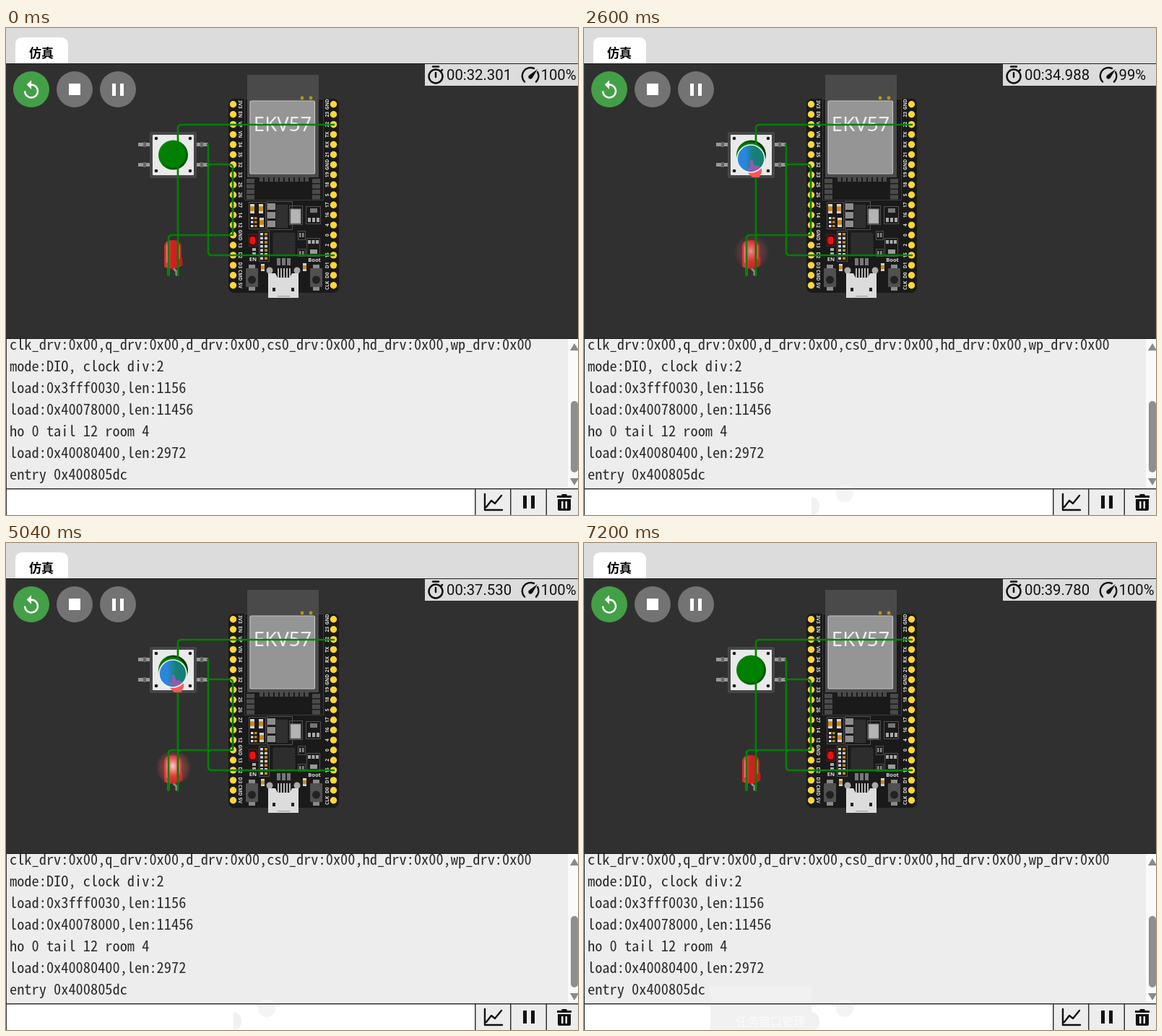
An HTML page for the animation above (7240 ms loop, 792 by 675 pixels).

```html
<!DOCTYPE html>
<html lang="zh">
<head>
<meta charset="utf-8">
<style>
html, body { margin: 0; width: 792px; height: 675px; overflow: hidden; background: #303030; }
svg { display: block; }
.log { font: 20.36px 'Noto Sans Mono CJK SC', 'Liberation Mono', monospace; font-size-adjust: ch-width .5; fill: #2c2c2c; }
.tab { font: bold 17px 'Noto Sans CJK SC', 'Noto Sans CJK', sans-serif; }
.hud { font: 20.3px Roboto, sans-serif; fill: #111; }
.pin { font: bold 6.6px 'Noto Sans', sans-serif; fill: #ddd; text-anchor: middle; }
.chip { font: 27.5px 'Noto Sans', 'Open Sans', sans-serif; fill: #efefef; text-anchor: middle; }
.line { fill: none; stroke-linecap: round; stroke-linejoin: round; }
</style>
</head>
<body>
<svg width="792" height="675" viewBox="0 0 792 675">
  <defs>
    <linearGradient id="cap" x1="0" y1="0" x2="1" y2="1">
      <stop offset="0" stop-color="#0c8a0c"/><stop offset=".5" stop-color="#007400"/><stop offset="1" stop-color="#043c04"/>
    </linearGradient>
    <linearGradient id="capDown" x1="0" y1="1" x2="1" y2="0">
      <stop offset="0" stop-color="#008000"/><stop offset=".5" stop-color="#007000"/><stop offset="1" stop-color="#021802"/>
    </linearGradient>
    <linearGradient id="lens">
      <stop offset=".3" stop-color="#2a86dc"/><stop offset=".6" stop-color="#168078"/>
    </linearGradient>
    <linearGradient id="bulb">
      <stop offset="0" stop-color="#c82424"/><stop offset=".2" stop-color="#e05050"/><stop offset=".4" stop-color="#cf2020"/>
      <stop offset=".8" stop-color="#cf2020"/><stop offset="1" stop-color="#b81818"/>
    </linearGradient>
    <radialGradient id="glow">
      <stop offset="0" stop-color="#ff8080" stop-opacity=".5"/><stop offset=".5" stop-color="#ff6060" stop-opacity=".4"/>
      <stop offset=".8" stop-color="#c05050" stop-opacity=".28"/><stop offset="1" stop-color="#a04848" stop-opacity="0"/>
    </radialGradient>
    <radialGradient id="core">
      <stop offset="0" stop-color="#fff" stop-opacity=".8"/><stop offset="1" stop-color="#ffb0a8" stop-opacity="0"/>
    </radialGradient>
    <clipPath id="logClip"><path d="M0 431h778v206H0z"/></clipPath>
  </defs>

  <!-- header -->
  <path fill="#dcdcdc" d="M0 0h792v49H0z"/>
  <path fill="#fff" d="M13 49V23q0-10 10-10h53q10 0 10 10v26z"/>
  <text class="tab" x="32" y="41">仿真</text>
  <path fill="#1c1c1c" d="M0 49h792v1H0z"/>

  <!-- transport buttons -->
  <circle cx="35" cy="85" r="25" fill="#43a047"/>
  <circle cx="95" cy="85" r="25" fill="#737373"/>
  <circle cx="155" cy="85" r="25" fill="#737373"/>
  <path fill="#fff" transform="translate(19.8 71) scale(1.27)" d="M12 5V1L7 6l5 5V7c3.31 0 6 2.69 6 6s-2.69 6-6 6-6-2.69-6-6H4c0 4.42 3.58 8 8 8s8-3.58 8-8-3.58-8-8-8z"/>
  <path fill="#fff" d="M87 77h16v16H87zM147 77h5v17h-5zM158 77h5v17h-5z"/>

  <!-- clock panel -->
  <path fill="#dcdcdc" d="M580 50h212v30H580z"/>
  <g class="line" stroke="#111" stroke-width="2.5">
    <circle cx="595" cy="67" r="9.5"/>
    <path d="M591 53.5h8M595 62v6M602 60l2-2"/>
    <path d="M718 74.5A11.5 11.5 0 0 1 731 56M736 61A11.5 11.5 0 0 1 734 74.5"/>
  </g>
  <path fill="#111" d="M736 57l-7 12q-2 3-5 1-2-3 1-5z"/>
  <text class="hud" id="clock" x="610" y="72"></text>
  <text class="hud" id="speed" x="740.5" y="72"></text>

  <g id="board"></g>

  <!-- push button -->
  <path fill="#999" d="M183 159h18v5h-18zM183 187h18v5h-18zM263 159h17v5h-17zM263 187h17v5h-17z"/>
  <path fill="#666" d="M190 158h4v7h-4zM190 186h4v7h-4zM269 158h4v7h-4zM269 186h4v7h-4z"/>
  <rect x="199" y="144" width="65" height="64" rx="2" fill="#464646"/>
  <rect x="203" y="148" width="57" height="56" rx="1" fill="#eaeaea"/>
  <g fill="#1c1c1c"><circle cx="208" cy="153" r="2.3"/><circle cx="255" cy="153" r="2.3"/><circle cx="208" cy="198" r="2.3"/><circle cx="255" cy="198" r="2.3"/></g>
  <circle id="capRim" cx="231.5" cy="176" r="20.5"/>
  <circle cx="231.5" cy="176" r="17.5" fill="#008000"/>

  <!-- lamp -->
  <path class="line" stroke="#8c8c8c" stroke-width="3" d="M225 331v11M232 331q0 4 4 6v5"/>
  <path fill="url(#bulb)" d="M219 331V304q0-10 12-10t12 10v13l1.500 3v9q-12 8-25.500 2z"/>
  <path fill="#fff" opacity=".3" d="M222 303q1-5 5-6-2 3-2 8v20h-3z"/>
  <path fill="#fff" opacity=".25" d="M238 298q3 2 3 6v16h-2z"/>
  <g id="light">
    <circle cx="232" cy="311" r="25" fill="url(#glow)"/>
    <ellipse cx="231" cy="309" rx="11" ry="15" fill="url(#core)"/>
  </g>

  <!-- wires -->
  <path class="line" stroke="#008000" stroke-width="2.7" d="M454 134H243q-5 0-5 5V343M225 343V292q0-5 5-5H314V194q0-5-5-5H279M279 161q1 1 1 5V310q0 5 5 5H454"/>

  <!-- console -->
  <path fill="#1c1c1c" d="M0 430h792v1H0z"/>
  <path fill="#ededed" d="M0 431h792v207H0z"/>
  <g id="log" class="log" clip-path="url(#logClip)"></g>
  <path fill="#fafafa" d="M778 431h14v207h-14z"/>
  <rect x="782" y="517" width="10" height="99" rx="5" fill="#8f8f8f"/>
  <path fill="#8a8a8a" d="M781 447l6-10 6 10zM781 624l6 10 6-10z"/>
  <path fill="#fff" d="M0 639h650v36H0z"/>
  <path fill="#ededed" d="M650 639h142v36H650z"/>
  <g id="residue">
    <circle cx="361" cy="645" r="12" fill="#f4f4f4"/>
    <path fill="#f1f1f1" d="M315 650q11 2 11 13 0 10-9 12h-2z"/>
  </g>
  <g id="tip">
    <path fill="#f1f1f1" d="M175 615h140v35q11 2 11 13 0 10-9 12H175z"/>
    <text x="210" y="669" font-size="16" fill="#fafafa" font-family="'Noto Sans CJK SC', sans-serif">任务窗口管理</text>
  </g>
  <path fill="#333" d="M0 638h792v1.500H0zM649 639h1.500v36H649zM698 639h1.500v36H698zM747.500 639h1.500v36h-1.500zM0 50h1v625H0z"/>
  <path class="line" stroke="#111" stroke-width="2.4" d="M663 646v22h24M665 664l7-9 5 4 9-11"/>
  <path fill="#111" d="M716 648h5v18h-5zM727 648h5v18h-5zM763 648h6l1-2h6l1 2h6v3h-20zM764 653h18v14q0 2-2 2h-14q-2 0-2-2z"/>
  <path fill="#ededed" d="M769 656h2.500v10H769zM774.500 656h2.500v10h-2.500z"/>

  <!-- pointer, and the lens that marks a press -->
  <path id="hand" d="M-3 2q2-4 5 0l2 8q7 0 9.500 3 2 6-2 10l-.5 3H1q-5-4-9-11 0-3 4-2l2 2z"/>
  <g id="lensMark">
    <circle cx="231" cy="181" r="19" fill="url(#lens)"/>
    <path fill="#a855b4" opacity=".85" transform="translate(232 182)" d="M-2 2q2-3 4 0l1 6q7 0 9 4l-4 4H-3l-5-5 4 0 2 1z"/>
    <circle cx="231" cy="181" r="19" fill="none" stroke="#e8f4f4" stroke-width="1.6"/>
  </g>
</svg>
<script>
const LOOP = 7240, STEP = 40;
const $ = id => document.getElementById(id);
const rect = (x, y, w, h, fill, more = '') => `<rect x="${x}" y="${y}" width="${w}" height="${h}" fill="${fill}" ${more}/>`;
const dot = (x, y, r, fill) => `<circle cx="${x}" cy="${y}" r="${r}" fill="${fill}"/>`;
const box = (x, y, w, h) => rect(x, y, w, h, 'none', 'stroke="#505050"');
const times = (n, fn) => Array.from({ length: n }, (_, i) => fn(i)).join('');
const part = (x, y, w = 6, h = 13) => rect(x, y, w, h, '#d5d5d5') + rect(x, y + h * .25, w, h * .5, '#c98a12');

function pins(names, dotX, textX, angle) {
  return names.split(' ').map((name, i) => {
    const y = 105.8 + i * 13.94;
    return dot(dotX, y, 4.7, '#ffd63a') +
      `<text class="pin" transform="translate(${textX} ${y}) rotate(${angle})">${name}</text>`;
  }).join('');
}

function tactSwitch(x) {
  return rect(x + 4, 328, 9, 36, '#8a8a8a') + rect(x, 333, 17, 26, '#505050', 'rx="1"') + dot(x + 8.5, 349, 5.5, '#222');
}

function board() {
  return rect(308, 98, 153, 269, '#1a1a1a', 'rx="8"') +
    rect(330.5, 98.5, 109, 140, '#1a1a1a', 'stroke="#3c3c3c"') +
    rect(334, 65, 99, 142, '#4a4a4a') +
    dot(410, 97, 2.4, '#b8960c') + dot(422, 97, 2.4, '#b8960c') +
    rect(338, 101, 89.5, 101, '#959595', 'rx="2" stroke="#c4c4c4" stroke-width="1.2"') +
    `<text class="chip" x="383" y="143">EKV57</text>` +
    times(10, i => rect(351 + i * 7, 207, 5, 6, '#4a4a4a')) +
    times(4, i => rect(333, 209 + i * 7.5, 11, 6, '#4a4a4a') + rect(424, 209 + i * 7.5, 11, 6, '#4a4a4a')) +
    // power section
    box(336.5, 241.5, 23, 37) + part(338, 244) + part(350, 244) + part(351, 263) +
    times(3, i => rect(339, 262 + i * 5.5, 3.5, 3, '#ddd') + rect(344, 262 + i * 5.5, 3.5, 3, '#c98a12')) +
    box(361.5, 240.5, 35, 39) + rect(373, 244, 18, 34, '#303030', 'stroke="#111"') +
    times(3, i => rect(362, 243 + i * 12, 11, 9, '#8d8d8d')) +
    box(392.5, 246.5, 18, 26) + rect(394, 251, 14, 20, '#b4b4b4', 'stroke="#888"') +
    box(415.5, 247.5, 20, 24) + rect(421, 250, 10, 6, '#777') +
    times(3, i => rect(418 + i * 6, 263, 4, 6, '#aaa')) +
    // status lamp, resistors, controller
    rect(336.5, 286, 11, 16, '#3a0c0c', 'stroke="#602020"') + rect(337.5, 289, 8, 11, '#f01010', 'rx="4"') +
    times(2, i => rect(341, 305 + i * 6, 5, 4, '#aaa')) +
    box(350.5, 281.5, 14, 42) +
    times(7, i => rect(352, 284 + i * 5.6, 4, 3.5, '#ccc') + rect(358, 284 + i * 5.6, 4, 3.5, i % 2 ? '#ccc' : '#c98a12')) +
    rect(370, 284, 30, 32, '#2d2d2d', 'rx="2" stroke="#3a3a3a" stroke-dasharray="2 2"') +
    box(404.5, 281.5, 10, 12) + box(404.5, 306.5, 10, 10) +
    times(4, i => rect(406 + i % 2 * 4, 284 + (i >> 1) * 25, 2.5, 6, '#888')) +
    box(416.5, 291.5, 18, 25) +
    times(3, i => rect(418 + i * 5.5, 294, 4, 5, '#aaa')) + rect(421, 307, 10, 6, '#999') +
    `<text class="pin" style="font-size:7.5px" x="342" y="323">EN</text>` +
    `<text class="pin" style="font-size:7.5px" x="427" y="324">Boot</text>` +
    tactSwitch(332) + tactSwitch(421) +
    part(353, 327, 5, 10) + part(411, 326, 5, 11) +
    times(3, i => rect(375 + i * 7, 319, 5, 10, '#777')) +
    times(5, i => rect(376 + i * 4, 333, 2, 13, '#bbb')) +
    dot(365, 336, 4.5, '#aaa') + dot(403, 336, 4.5, '#aaa') +
    `<path fill="#dcdcdc" d="M363 340h10l3 6h17l3-6h9v34h-42z"/>` +
    rect(369, 360, 4, 5, '#222') + rect(395, 360, 4, 5, '#222') + rect(376, 371, 17, 1.5, '#aaa') +
    pins('3V3 EN VP VN 34 35 32 33 25 26 27 14 12 GND 13 D2 D3 CMD 5V', 314.5, 322, 90) +
    pins('GND 23 22 TX RX 21 GND 19 18 5 17 16 4 0 2 15 D1 D0 CLK', 453.5, 447, -90);
}

$('board').innerHTML = board();
$('log').innerHTML = [
  'clk_drv:0x00,q_drv:0x00,d_drv:0x00,cs0_drv:0x00,hd_drv:0x00,wp_drv:0x00',
  'mode:DIO, clock div:2', 'load:0x3fff0030,len:1156', 'load:0x40078000,len:11456',
  'ho 0 tail 12 room 4', 'load:0x40080400,len:2972', 'entry 0x400805dc'
].map((s, i) => `<text x="5" y="${446 + i * 30}">${s}</text>`).join('');

// key lists: [time, value, ...]
const clockKeys = [[0, 32301], [1040, 33377], [2000, 34363], [3200, 35613], [5040, 37530], [5920, 38474], [7200, 39780], [7240, 39820]];
const handKeys = [[0, 330, 690], [280, 330, 690], [640, 152, 291], [1100, 152, 291], [1480, 232, 181], [5320, 232, 181],
  [5920, 237, 240], [6120, 240, 534], [6320, 245, 690], [7240, 245, 690]];
const slow = [[700, 1100], [1600, 1900], [2600, 2900], [3400, 3700], [4200, 4500], [4800, 4960], [5700, 6950]];
const hover = [1520, 5320], held = [2040, 5280];

function at(keys, t) {
  const i = keys.findIndex(k => k[0] > t), a = keys[i - 1], b = keys[i];
  const u = (t - a[0]) / (b[0] - a[0]);
  return a.slice(1).map((v, j) => v + (b[j + 1] - v) * u);
}
const within = (t, [a, b]) => t >= a && t < b;
const show = (id, on) => $(id).setAttribute('visibility', on ? 'visible' : 'hidden');

function draw(t) {
  const [ms] = at(clockKeys, t);
  $('clock').textContent = '00:' + (ms / 1000).toFixed(3);
  $('speed').textContent = slow.some(s => within(t, s)) ? '99%' : '100%';

  const [x, y] = at(handKeys, t);
  $('hand').setAttribute('transform', `translate(${x} ${y})`);
  $('hand').setAttribute('fill', x > 205 && y < 560 ? '#ff5757' : '#5057ff');

  const down = within(t, held);
  show('lensMark', within(t, hover));
  $('capRim').setAttribute('fill', `url(#${down ? 'capDown' : 'cap'})`);

  // the lamp breathes while the button is held
  const phase = (t - held[0]) / 2000;
  const level = down ? 1 - Math.abs(1 - 2 * (phase % 1)) : 0;
  $('light').setAttribute('opacity', level && .15 + .8 * level);

  show('residue', t >= 640);
  show('tip', t >= 6400);
}

const start = performance.now();
function tick() {
  const t = (performance.now() - start) % LOOP;
  draw(Math.floor(t / STEP) * STEP);
  requestAnimationFrame(tick);
}
tick();
</script>
</body>
</html>
```
